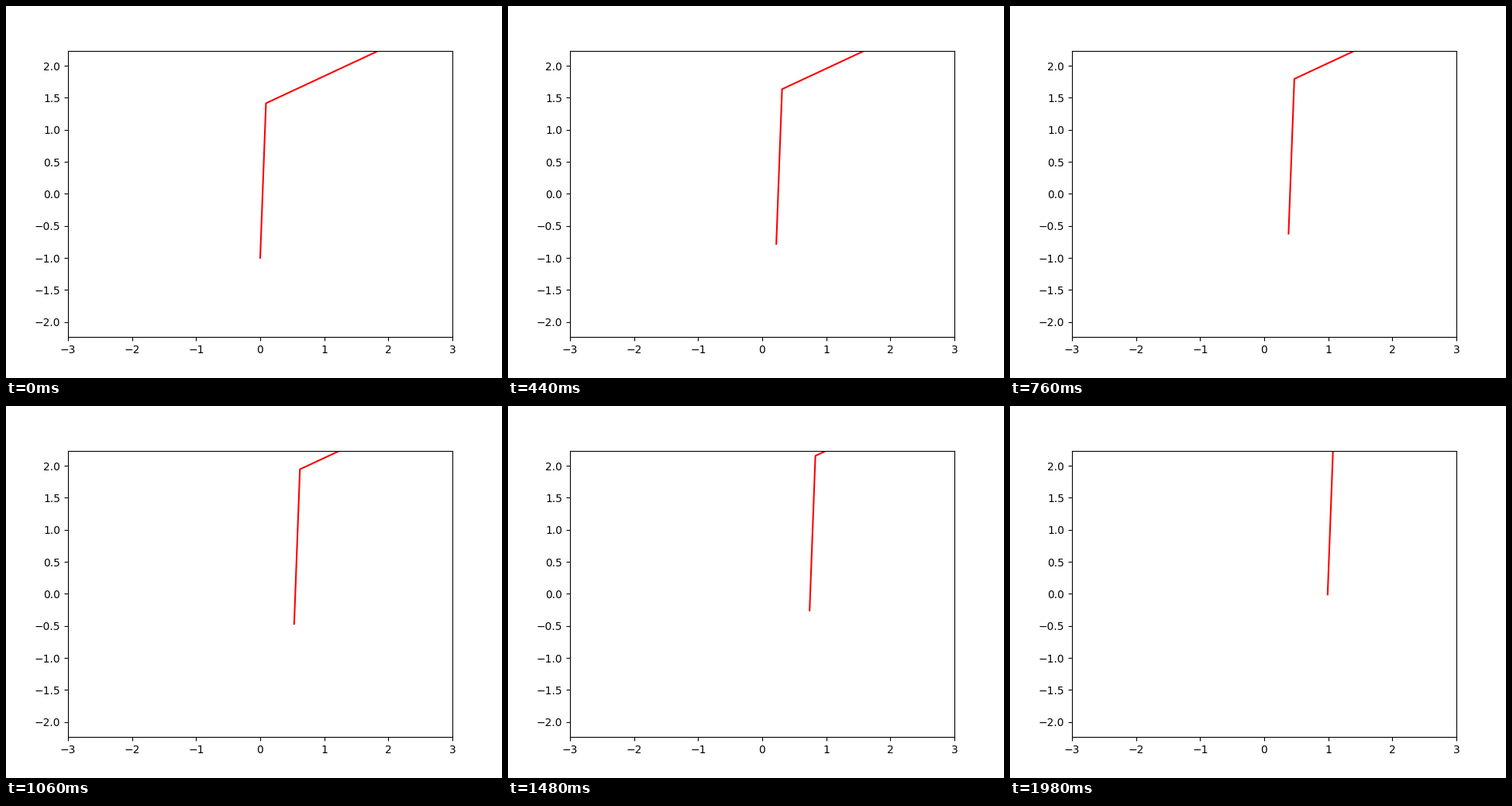
A matplotlib script for the animation above (2000 ms loop, 640 by 480 pixels).

```python
import numpy as np
import matplotlib.pyplot as plt
from matplotlib.animation import FuncAnimation

FRAMES = 100
STEP = 0.01  # shift per frame along x and y

# Two-link arm: base, elbow, and a far end outside the view
base = np.array([0.0, -1.0])
elbow = np.array([0.09, np.sqrt(2)])
angle = np.radians(25)
tip = elbow + 2.4 * np.array([np.cos(angle), np.sin(angle)])
arm = np.array([base, elbow, tip])

fig, ax = plt.subplots(figsize=(6.4, 4.8), dpi=100)
half_height = 3 * (0.77 * 4.8) / (0.775 * 6.4)  # equal scale on both axes
ax.set_xlim(-3, 3)
ax.set_ylim(-half_height, half_height)
line, = ax.plot([], [], color="red", lw=1.5)


def update(i):
    x, y = (arm + STEP * i).T
    line.set_data(x, y)
    return line,


anim = FuncAnimation(fig, update, frames=FRAMES, interval=20,
                     repeat=True, repeat_delay=0)
plt.show()
```
